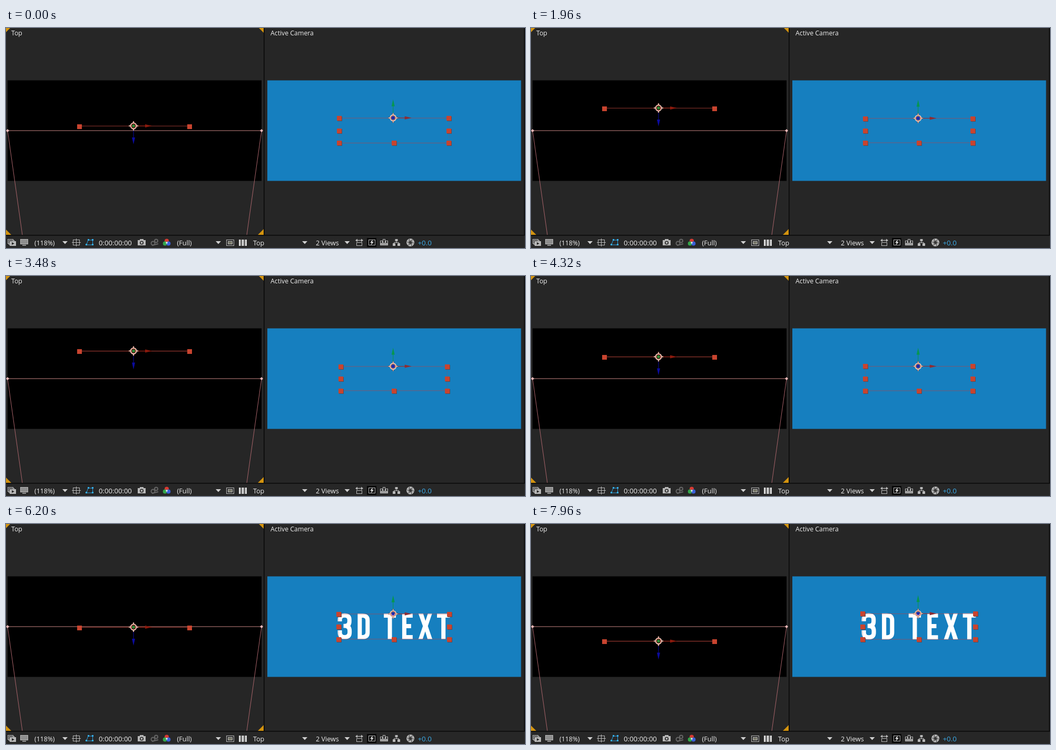
An HTML page with a canvas that plays this animation: 985x418 px, repeating every 8000 ms.

```html
<!DOCTYPE html>
<html lang="en">
<head>
<meta charset="utf-8">
<title>Two views of a 3D layer</title>
<style>
html, body { margin: 0; width: 100%; height: 100%; overflow: hidden; background: #262626; }
canvas { display: block; }
</style>
</head>
<body>
<canvas id="stage" width="985" height="418" aria-label="3D TEXT"></canvas>
<script>
const ctx = document.getElementById('stage').getContext('2d');
const LOOP = 8000;
const FONT = '"Open Sans", "Noto Sans", sans-serif';
const RED = '#c8442f', ICON = '#b9b9b9';
const MID_X = 736.4, MID_Y = 195;

// The layer is dragged in small jerks: [time, depth in the top view].
const DRAG = [
  [0, 186], [240, 181], [520, 176], [800, 173], [1080, 167.3], [1400, 162],
  [1680, 156], [1960, 152], [2240, 148], [2520, 143.5], [2800, 141.7],
  [3480, 142.4], [3760, 144.5], [4040, 150], [4320, 153.4], [4600, 158],
  [4920, 167], [5240, 175], [5520, 183.7], [5840, 191], [6120, 196],
  [6400, 200], [6680, 204], [6960, 208.5], [7240, 213], [7520, 218], [7840, 222.4]
];

const LETTERS = new Path2D(
  'M633 185V182Q633 173.7 642 173.7Q651.3 173.7 651.3 182V185Q651.3 193.6 643 193.6H640' +
  'M643 193.6Q651.7 194 651.7 203V206Q651.7 215 642 215Q633 215 633 206V202' +
  'M671 174V215H676Q686 215 686 206V183Q686 174 676 174Z' +
  'M717 174H740M728.5 174V219M772 174H756V215H772M756 194H769' +
  'M818.5 174H843M830.7 174V219');
const LETTER_X = new Path2D(
  'M783 170H792L796.5 184L801 170H809L801 194L809.5 219H800.5L796 204L791 219H783L791.5 194Z');

function rect(x, y, w, h, color) {
  ctx.fillStyle = color;
  ctx.fillRect(x, y, w, h);
}

function frame(x, y, w, h, color) {
  ctx.strokeStyle = color;
  ctx.lineWidth = 1;
  ctx.strokeRect(x + .5, y + .5, w - 1, h - 1);
}

function line(points, color, width = 1) {
  ctx.strokeStyle = color;
  ctx.lineWidth = width;
  ctx.beginPath();
  for (let i = 0; i < points.length; i += 2) ctx.lineTo(points[i], points[i + 1]);
  ctx.stroke();
}

function poly(points, color) {
  ctx.fillStyle = color;
  ctx.beginPath();
  for (let i = 0; i < points.length; i += 2) ctx.lineTo(points[i], points[i + 1]);
  ctx.fill();
}

function disc(x, y, r, color) {
  ctx.fillStyle = color;
  ctx.beginPath();
  ctx.arc(x, y, r, 0, 7);
  ctx.fill();
}

function ring(x, y, r, color, width = 1) {
  ctx.strokeStyle = color;
  ctx.lineWidth = width;
  ctx.beginPath();
  ctx.arc(x, y, r, 0, 7);
  ctx.stroke();
}

function label(text, x, y, size, color = '#eeeeee') {
  ctx.font = `${size}px ${FONT}`;
  ctx.fillStyle = color;
  ctx.fillText(text, x, y);
}

function corner(x, y, dx, dy) {
  poly([x, y, x + dx, y, x, y + dy], '#d3930f');
}

function dropArrow(x) {
  poly([x - 5, 405, x + 5, 405, x, 410.5], '#d0d0d0');
}

function handle(x, y, shadow) {
  const left = Math.round(x - 4.5), top = Math.round(y - 4.5);
  if (shadow) rect(left + 1, top + 1, 9, 9, '#5b4a52');
  rect(left, top, 9, 9, RED);
}

function arrow(x, y, angle, color) {
  ctx.save();
  ctx.translate(x, y);
  ctx.rotate(angle);
  line([7, 0, 23, 0], color);
  poly([22, -3, 35, 0, 22, 3], color);
  ctx.restore();
}

function anchor(x, y, core) {
  for (const [width, color, len] of [[3, '#6d3029', 9], [1.4, '#f3d9c9', 9]]) {
    line([x - len, y, x - 4, y], color, width);
    line([x + 4, y, x + len, y], color, width);
    line([x, y - len, x, y - 4], color, width);
    line([x, y + 4, x, y + len], color, width);
  }
  ring(x, y, 5.2, '#f0cfc0', 2.6);
  ring(x, y, 4.3, '#b5483c', 1.2);
  disc(x, y, 2.8, core);
}

function toolbar() {
  rect(0, 393, 985, 25, '#272727');
  rect(0, 393, 985, 1.5, '#080808');

  // Stacked frames and monitor
  frame(3, 401, 11, 9, ICON);
  frame(5, 403, 11, 9, ICON);
  rect(7, 405, 12, 9, ICON);
  poly([11, 407, 16, 409.5, 11, 412], '#272727');
  rect(27, 401, 15, 10, '#8e8e8e');
  frame(27, 401, 15, 10, ICON);
  rect(31, 412, 7, 1.5, ICON);

  label('(118%)', 54, 412.5, 12.3);
  dropArrow(112);

  // Guides and mask outline
  frame(127, 402, 13, 11, ICON);
  line([133.5, 400, 133.5, 415], ICON);
  line([125, 407.5, 142, 407.5], ICON);
  line([152.5, 412, 156, 403, 164.5, 403, 164.5, 412, 152.5, 412], '#2d9fe0');
  for (const [x, y] of [[151, 410], [155, 401], [163, 401], [163, 410]])
    rect(x, y, 3, 3, '#35b0f0');

  label('0:00:00:00', 176, 412.5, 13.1);

  // Snapshot camera, recall, channels
  rect(250, 403, 15, 10, ICON);
  rect(254, 401, 7, 3, ICON);
  disc(257.5, 408, 3.6, '#272727');
  disc(257.5, 408, 2, ICON);
  ring(285, 404.5, 3, '#656565', 2);
  ring(279, 409, 3.5, '#656565', 2);
  line([277, 413, 289, 410], '#656565', 2);
  disc(305, 404.5, 4, '#d83a32');
  disc(301.7, 409.5, 4, '#34a64a');
  disc(308.3, 409.5, 4, '#3a60d8');
  disc(305, 408, 1.8, '#e8e8e8');

  label('(Full)', 324.5, 412.5, 12.6);
  dropArrow(403);

  // Region and transparency grid
  frame(418, 402, 15, 12, ICON);
  frame(421, 405, 9, 6, ICON);
  rect(422, 406, 7, 4, '#747465');
  rect(442, 402, 15, 12, '#686868');
  for (let i = 0; i < 20; i++)
    if ((i + (i / 5 | 0)) % 2 === 0) rect(442 + i % 5 * 3, 402 + (i / 5 | 0) * 3, 3, 3, '#d8d8d8');

  label('Top', 469, 412.5, 12.5);
  dropArrow(567);
  label('2 Views', 588, 412.5, 12.6);
  dropArrow(647.5);

  // Pixel aspect
  line([665, 403.5, 676, 403.5], ICON, 1.4);
  poly([663, 403.5, 667, 400.5, 667, 406.5], ICON);
  poly([678, 403.5, 674, 400.5, 674, 406.5], ICON);
  frame(665, 407, 11, 7, ICON);

  // Fast preview
  rect(685, 399, 18, 17, '#070707');
  frame(688, 402, 13, 11, ICON);
  poly([696, 402, 691, 408, 694, 408, 692, 413, 698, 406.5, 695, 406.5], '#e8e8e8');

  // Timeline and flowchart
  frame(710, 404, 5, 9, ICON);
  frame(715, 401, 5, 12, ICON);
  frame(720, 404, 5, 9, ICON);
  rect(711, 408, 13, 4, '#999999');
  rect(738.5, 401, 5, 4, ICON);
  line([741, 405, 741, 409], ICON);
  line([736.5, 410, 736.5, 407.5, 745.5, 407.5, 745.5, 410], ICON);
  rect(734, 409, 5, 5, ICON);
  rect(743, 409, 5, 5, ICON);

  // Exposure
  disc(767.5, 407.5, 7.5, ICON);
  for (let i = 0; i < 6; i++) {
    const a = i * Math.PI / 3, b = a + 1.3;
    line([767.5 + 3 * Math.cos(a), 407.5 + 3 * Math.sin(a),
          767.5 + 7 * Math.cos(b), 407.5 + 7 * Math.sin(b)], '#333333');
  }
  disc(767.5, 407.5, 2.5, '#333333');
  label('+0.0', 781.5, 412.5, 13.3, '#3ba9e6');
}

function panels() {
  rect(0, 0, 985, 418, '#262626');
  rect(3, 99.5, 482, 191, '#000000');
  rect(496, 99.5, 481.5, 191, '#167fbf');
  rect(489, 0, 1.5, 394, '#060606');
  rect(983, 0, 2, 394, '#0d0d0d');
  corner(0, 0, 8, 8);
  corner(489, 0, -9, 9);
  corner(0, 393, 10, -10);
  corner(489, 393, -11, -11);
  label('Top', 10, 14, 12.3);
  label('Active Camera', 502, 14, 12.3);
}

function cameraCone() {
  line([3, 195, 31, 393], '#a8646a');
  line([485, 195, 457, 393], '#a8646a');
  line([3, 195, 485, 195], '#c98784', 1.2);
  for (const x of [3, 485]) poly([x - 3, 195, x, 192, x + 3, 195, x, 198], '#eeb9b9');
}

function topView(y) {
  line([144, y + .2, 344, y + .2], '#94372f', 1.1);
  handle(139.5, y + 1);
  handle(348.5, y + 1);
  arrow(242, y, 0, '#8c1a0d');
  arrow(242, y, Math.PI / 2, '#0b0b9e');
  anchor(242, y, '#2f8a35');
}

function cameraView(y) {
  const s = 1 + (y - 195) * .0007;
  const left = MID_X - 104.9 * s, right = MID_X + 104.9 * s;
  const top = MID_Y + .3 - 24 * s, bottom = MID_Y + .3 + 23.7 * s;

  // The solid plane hides the text until it moves in front.
  if (y > 195) {
    ctx.save();
    ctx.translate(MID_X, MID_Y);
    ctx.scale(s / 1.0063, s / 1.0063);
    ctx.translate(-MID_X, -MID_Y);
    ctx.strokeStyle = ctx.fillStyle = '#ffffff';
    ctx.lineWidth = 8;
    ctx.stroke(LETTERS);
    ctx.fill(LETTER_X);
    ctx.restore();
  }

  const edge = 'rgba(190, 62, 62, .6)';
  line([left, top - .3, right, top - .3], edge);
  line([left, bottom - .3, right, bottom - .3], edge);
  line([left, top, left, bottom], 'rgba(150, 80, 100, .35)');
  line([right, top, right, bottom], 'rgba(150, 80, 100, .35)');
  for (const x of [left, right])
    for (const h of [top, 195.5, bottom]) handle(x, h, true);
  handle(736.5, bottom, true);

  const ay = MID_Y - 24.3 * s;
  arrow(734.7, ay, 0, '#8d2d33');
  arrow(734.7, ay, -Math.PI / 2, '#079650');
  anchor(734.7, ay, '#2420a8');
}

function draw(now) {
  const t = now % LOOP;
  let y = DRAG[0][1];
  for (const [at, depth] of DRAG) if (t >= at) y = depth;
  panels();
  cameraCone();
  topView(y);
  cameraView(y);
  toolbar();
}

const start = performance.now();
function tick() {
  draw(performance.now() - start);
  requestAnimationFrame(tick);
}
tick();
</script>
</body>
</html>
```
